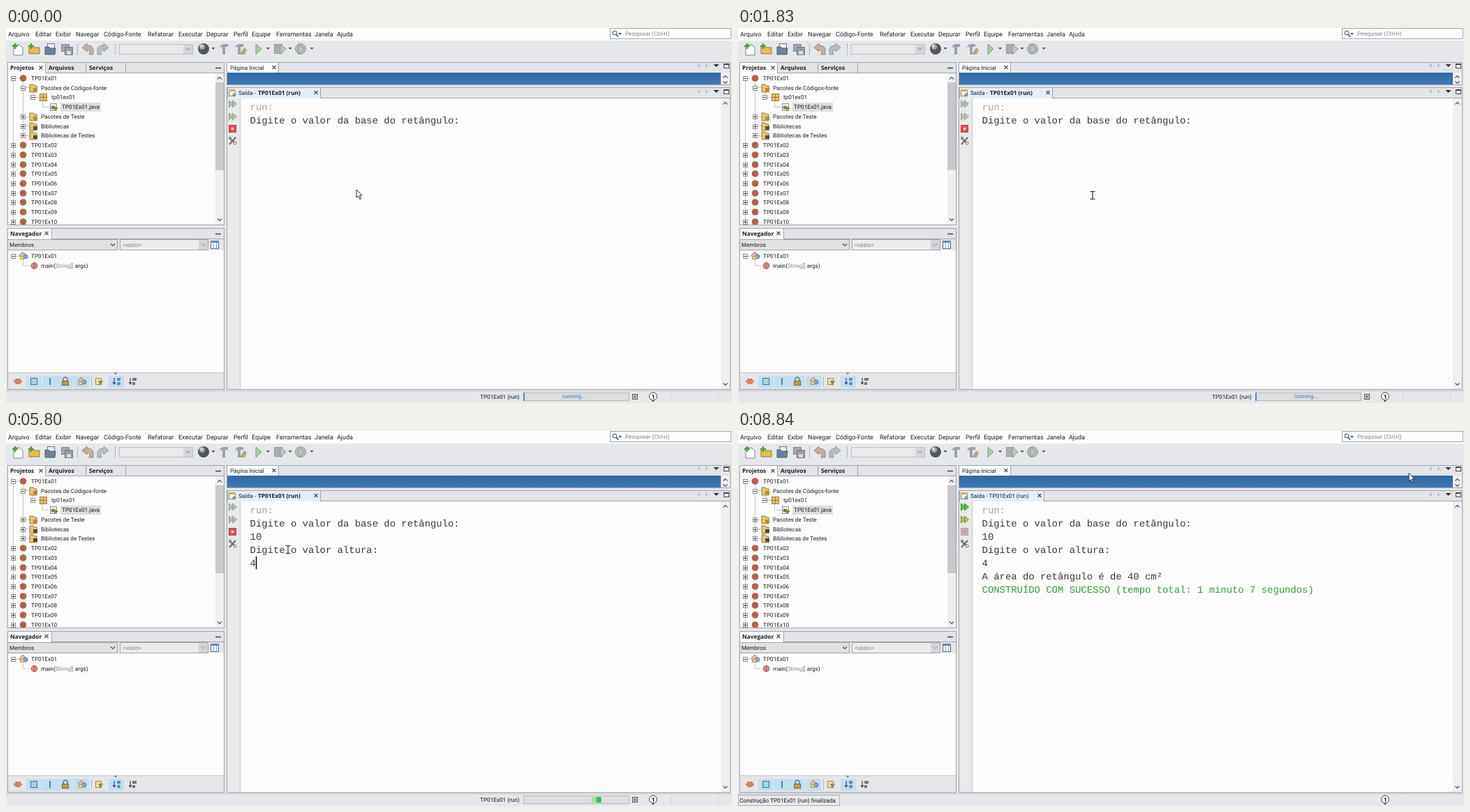
Write an HTML page that moves like this. It is 1040x538 px and loops after 8.87 s.

```html
<!DOCTYPE html>
<html lang="pt">
<head>
<meta charset="utf-8">
<title>Saída - TP01Ex01</title>
<style>
html, body { margin: 0; width: 100%; height: 100%; overflow: hidden; background: #e6e7ea; }
svg { display: block; width: 1040px; height: 538px; }
text { font: 8.2px Roboto, "Open Sans", sans-serif; fill: #1c1c22; white-space: pre; text-rendering: geometricPrecision; }
.menu { font-size: 9px; }
.bold { font: 700 8.3px "Open Sans", sans-serif; }
.dim { fill: #85858a; }
.blue { fill: #3a7fc0; }
.mono { font: 13.9px "Liberation Mono", "Courier New", monospace; fill: #39393d; }
.run { fill: #a2a2a2; }
.ok { fill: #399a39; }
</style>
</head>
<body>
<svg id="stage" viewBox="0 0 1040 538" xmlns="http://www.w3.org/2000/svg"></svg>
<script>
const LOOP = 8870, BG = '#e6e7ea', WHITE = '#fdfdfd', EDGE = '#a3a5ab';
const stage = document.getElementById('stage');

const rect = (x, y, w, h, fill, stroke) => stroke
  ? `<rect x="${x + .5}" y="${y + .5}" width="${w - 1}" height="${h - 1}" fill="${fill}" stroke="${stroke}"/>`
  : `<rect x="${x}" y="${y}" width="${w}" height="${h}" fill="${fill}"/>`;
const text = (x, y, s, cls = '') => `<text x="${x}" y="${y}" class="${cls}">${s}</text>`;
const line = (d, stroke = '#444', w = 1) => `<path d="${d}" fill="none" stroke="${stroke}" stroke-width="${w}"/>`;
const shape = (d, fill, stroke = 'none') => `<path d="${d}" fill="${fill}" stroke="${stroke}"/>`;
const dot = (x, y, r, fill, stroke = 'none') => `<circle cx="${x}" cy="${y}" r="${r}" fill="${fill}" stroke="${stroke}"/>`;
const group = (id, body) => `<g id="${id}">${body}</g>`;
const cross = (x, y) => line(`M${x - 2.5} ${y - 2.5}l5 5m0-5l-5 5`, '#444', 1.1);
const chevron = (x, y, dir = 1, color = '#555') => line(`M${x - 3} ${y - 1.5 * dir}l3 ${3 * dir}l3 ${-3 * dir}`, color, 1.2);
const drop = (x, y, color = '#555') => shape(`M${x - 2.5} ${y - 1}h5l-2.5 3z`, color);
const vbar = (x, y, h, color = '#b5b6bb') => rect(x, y, 1, h, color);

function menuBar() {
  const items = { Arquivo: 3, Editar: 42, Exibir: 71, Navegar: 100, 'Código-Fonte': 140, Refatorar: 203, Executar: 247,
    Depurar: 287, Perfil: 326, Equipe: 352, Ferramentas: 387, Janela: 442, Ajuda: 474 };
  return rect(0, 0, 1040, 18, WHITE) +
    Object.entries(items).map(([s, x]) => text(x, 12, s, 'menu')).join('') +
    rect(865, 0, 174, 16, WHITE, EDGE) + dot(872, 7, 3, '#dfeaf2', '#3d5a70') +
    line('M874 9l3 3.5', '#3d5a70', 1.8) + drop(879.5, 8) + text(887, 11, 'Pesquisar (Ctrl+I)', 'dim');
}

const folder = (x, y, fill, w = 14) =>
  shape(`M${x} ${y + 11}v-11h5l2 2h${w - 7}v9z`, fill, '#8d7848');
const plus = (x, y) => line(`M${x - 4} ${y}h8m-4-4v8`, '#4c9e3e', 2.4);

function toolBar() {
  const grey = '#9b9ca0';
  const hammer = x => shape(`M${x - 6} 28q2-5 6-5h6v4h-4v11h-4v-11z`, '#9aa3ad');
  const play = (x, c) => shape(`M${x - 4} 23l8 7-8 8z`, c, '#8b9a8b');
  // Block arrow that bends back on itself; dir 1 points left
  const bend = (x, dir, fill, edge) =>
    shape(`M${x - 8 * dir} 28l${7 * dir}-6v3q${9 * dir} 0 ${9 * dir} 6 0 6-${0} 6l-${0} 1h${-6 * dir}q${3 * dir}-7 ${-3 * dir}-7v3z`, fill, edge);
  return shape('M11 24h8l5 4v11h-13z', WHITE, '#7d8790') + plus(13, 26) +
    folder(33, 26, '#e7bd55', 15) + plus(36, 26) +
    rect(59, 22, 11, 10, '#eceef0', '#6c7884') + shape('M56 38v-11h5l2 2h8l-1 9z', '#6d8296', '#47637a') +
    rect(79, 23, 12, 11, '#a5a9b2', '#858991') + rect(84, 27, 12, 12, '#969ba6', '#777b83') + rect(87, 33, 6, 5, '#d9dadd') +
    vbar(102, 22, 17) + vbar(156, 22, 17) +
    bend(117, 1, '#c3b0a0', '#9a8878') + bend(139, -1, '#b4bfc3', '#8f9ca1') +
    rect(162, 23, 106, 15, '#e9e9e9', '#bfbfc1') + rect(254, 24, 13, 13, '#d6d6d8') + chevron(260.5, 30, 1, grey) +
    dot(283, 30, 8, '#535659') + dot(281, 27, 4, '#a4a7aa') + dot(280, 26, 2, '#d9dadb') + drop(297, 29) +
    hammer(312) + hammer(334) + shape('M335 38l6-10 4 3-3 7z', '#b5a68c') +
    play(362, '#a9cfa4') + drop(375.5, 29) +
    rect(384, 23, 12, 14, '#acadb2', grey) + play(397, '#bccab9') + drop(407, 29) +
    dot(422, 30, 7.5, '#b9babf', grey) + play(423, '#b7cbb4') + drop(438, 29);
}

// Window frame with a tab strip on top
const pane = (x, y, w, h) => rect(x, y, w, h, WHITE, EDGE) + rect(x + 1, y + 1, w - 2, 15, '#e3e4e7') +
  rect(x, y + 15, w, 1, EDGE);
const tab = (x, y, w, fill = WHITE) => rect(x, y, w, 16, fill, EDGE) + rect(x + 1, y + 15, w - 2, 1, fill);
const expander = (x, y, open) => rect(x - 3, y - 3, 7, 7, WHITE, '#8c8c8c') +
  line(`M${x - 1.5} ${y + .5}h4` + (open ? '' : `m-2-2v4`), '#333');

function scrollBar(x, y, h, w = 13) {
  return rect(x, y, w, h, '#efeff0') + chevron(x + w / 2, y + 7, -1) + chevron(x + w / 2, y + h - 7);
}

function projects() {
  const rowY = i => 72 + i * 13.73;
  const label = (x, i, s) => text(x, rowY(i) + 3, s);
  let s = pane(2, 49, 311, 234) + tab(2, 49, 55) + vbar(114, 50, 14, EDGE) + vbar(171, 50, 14, EDGE) +
    text(6, 60, 'Projetos', 'bold') + cross(50, 57) + text(61, 60, 'Arquivos', 'bold') +
    text(119, 60, 'Serviços', 'bold') + line('M300 57.5h8', '#444', 1.5);
  s += line('M10.5 76V280M24.5 76V154M38.5 90V99M52.5 104V113M10 72h10M24 85.5h10M38 99.5h10M52 113.5h10M24 127.5h10M24 140.5h10M24 154.5h10', '#c6c6c6');
  for (let i = 0; i < 16; i++) {
    if (i && i < 7) continue;
    const n = i ? i - 5 : 1, y = Math.round(rowY(i));
    s += expander(10, y, !i) + dot(24.5, y, 4.8, '#b4604a') + label(36, i, 'TP01Ex' + String(n).padStart(2, '0'));
  }
  ['Pacotes de Códigos-fonte', 'Pacotes de Teste', 'Bibliotecas', 'Bibliotecas de Testes'].forEach((name, k) => {
    const i = k ? k + 3 : 1, y = Math.round(rowY(i));
    s += expander(24, y, !k) + folder(34, y - 5, '#e8c66b', 10) +
      rect(39, y, 6, 5, k > 1 ? '#4d4a45' : '#b98a35') + label(50, i, name);
  });
  s += expander(38, 99, true) + rect(48, 94, 11, 11, '#e2c078', '#a07c3a') + line('M48 99.5h11M53.5 94v11', '#a07c3a') +
    label(65, 2, 'tp01ex01') + rect(78, 107, 58, 13, '#dedee0') +
    rect(63, 108, 10, 11, '#eef0f2', '#8a949c') + dot(67, 114, 2.5, '#b4604a') + shape('M69 112l6 3-6 4z', '#49a540') +
    label(80, 3, 'TP01Ex01.java');
  return s + rect(3, 282, 309, 1, EDGE) + scrollBar(300, 65, 217, 12) + rect(300, 78, 12, 126, '#c9c9cb') + rect(0, 283, 314, 4, BG);
}

function navigator() {
  const shapes = (x, y) => shape(`M${x - 6} ${y}l5-5 5 5-5 5z`, '#e9b6a9', '#b8776a') +
    dot(x + 3, y + 2, 3, '#7fa9d6', '#4f7cab') + rect(x - 5, y + 1, 6, 5, '#ecd27e', '#b59a45');
  const on = x => rect(x - 11, 499, 22, 17, '#c3dff2');
  let s = pane(2, 287, 311, 232) + tab(2, 287, 64) + text(6, 298, 'Navegador', 'bold') + cross(58, 294.5) +
    line('M300 295.5h8', '#444', 1.5) + rect(3, 303, 309, 16, '#e6e6e8') +
    rect(2, 303, 158, 16, '#e1e1e2', EDGE) + text(5, 314, 'Membros') + chevron(153, 311) +
    rect(163, 303, 127, 16, '#ebebec', EDGE) + rect(276, 304, 13, 14, '#d5d5d7') + text(167, 314, '&lt;vazio&gt;', 'dim') + chevron(282.5, 311, 1, '#aaa') +
    rect(293, 305, 12, 12, WHITE, '#48698c') + rect(293, 305, 12, 3, '#5f8bb8') + line('M297.5 308v9M301.5 308v9', '#8aa4bd') +
    line('M10 327.5h10M24.5 331v10h9', '#c6c6c6') + expander(10, 327, true) + shapes(25, 326) + text(36, 330, 'TP01Ex01') +
    dot(40.5, 341, 4.4, '#d58a86', '#a95450') + line('M40.5 337v8', '#b3605c') +
    text(50, 344, 'main(<tspan class="dim">String[]</tspan> args)');
  s += rect(3, 494, 309, 24, '#e6e6e9') + rect(3, 494, 309, 1, '#c5c6ca') + drop(157, 495.5, '#888') +
    [40, 63, 85, 108, 158].map(on).join('') +
    shape('M11 507l3-4h6l3 4-3 4h-6z', '#b9694f') + line('M14 504v7M17 503v9M20 504v7', '#f0c5a0') +
    rect(35, 502, 10, 10, '#a9d2dc', '#447887') + rect(62, 502, 2, 10, '#54869c') +
    rect(80, 506, 10, 7, '#bd9b52', '#7f6a38') + line('M82 506v-3q3-4 6 0v3', '#777', 1.5) + shapes(109, 506) +
    vbar(122, 500, 15) + rect(128, 502, 9, 10, '#f2e0ab', '#a88849') + shape('M132 506h7l-4 7z', '#6f9a59');
  for (const x of [155, 178]) s += line(`M${x} 502v9m-2-3l2 3 2-3`, '#446', 1.2);
  return s + rect(159, 502, 5, 4, '#6a8cad') + dot(161.5, 510, 2.5, '#6a8cad') + rect(181, 502, 6, 4, '#777') + rect(181, 508, 4, 4, '#777');
}

const strip = y => shape(`M994 ${y - 3}v6l-4-3z`, '#bfc0c4') + shape(`M1002 ${y - 3}v6l4-3z`, '#bfc0c4') +
  shape(`M1013.5 ${y - 2}h8l-4 4z`, '#333') + rect(1028, y - 3, 8, 7, WHITE, '#444') + rect(1028, y - 3, 8, 2, '#444');

// Output tab and its side buttons, in the running or the finished state
function outputTab(done) {
  const w = done ? 122 : 134;
  const rerun = (y, c, e) => shape(`M319.5 ${y - 5}l6 5-6 5z`, c, e) + shape(`M324.5 ${y - 5}l6 5-6 5z`, c, e);
  return tab(317, 85, w, '#e5eef6') + rect(319, 88, 10, 10, '#f7f3e4', '#93805a') + rect(319, 88, 10, 3, '#d9ae59') +
    dot(327, 96, 2.5, '#7b98ae') +
    text(333, 96, done ? 'Saída - TP01Ex01 (run)' : 'Saída - ') +
    (done ? '' : text(361, 96, 'TP01Ex01 (run)', 'bold')) + cross(317 + w - 7, 92.5) +
    rerun(109, done ? '#5fc04e' : '#b4c0b2', done ? '#3a8c30' : '#96a394') +
    rerun(127, done ? '#b7cd4c' : '#b9c0b0', done ? '#76892f' : '#9aa291') +
    rect(319, 139, 11, 11, done ? '#cdb0b4' : '#e0525c', done ? '#b298a0' : '#b2414b') +
    rect(323, 143, 3, 3, done ? '#a99' : '#fff');
}

function editor() {
  return pane(316, 49, 722, 33) + tab(316, 49, 75) + text(321, 60, 'Página Inicial') + cross(384, 56.5) + strip(54) +
    rect(317, 64, 707, 18, 'url(#banner)') + rect(1024, 64, 13, 18, '#efeff0') +
    chevron(1030.5, 70, -1) + chevron(1030.5, 78) + rect(316, 81, 722, 1, EDGE) +
    pane(316, 85, 722, 434) + rect(317, 101, 18, 417, '#e9e9eb') + vbar(335, 101, 417, '#c9cacd') + strip(91) +
    scrollBar(1024, 101, 417) + group('tabRun', outputTab(false)) + group('tabDone', outputTab(true)) +
    line('M320 158l9 8M329 157l-9 10', '#6e6a62', 2) + dot(321, 158, 2.2, '#888d92') + dot(328, 165, 2, WHITE, '#666');
}

function statusBar() {
  return rect(0, 520, 1040, 1, '#c4c5c9') +
    group('job', text(679, 532, 'TP01Ex01 (run)') + rect(741, 523, 152, 12, '#dedfe0', '#b6b7ba') +
      group('idle', rect(741, 523, 2, 12, '#5a86bb') + text(797, 531, 'running...', 'blue')) +
      group('chunk', rect(0, 525, 7, 8, '#9fe0a9') + rect(7, 525, 7, 8, '#35c254')) +
      rect(897, 525, 8, 8, '#d8d8da', '#555') + line('M899 527l4 4m0-4l-4 4', '#555')) +
    shape('M925 533l2 4 2-4z', '#444') + dot(927, 528.5, 5.5, WHITE, '#444') + text(924.7, 531.7, '1', 'bold') +
    vbar(952, 524, 11, '#d2d3d6') + vbar(1020, 524, 11, '#d2d3d6') +
    group('built', rect(0, 522, 146, 16, '#e8e8ea', '#aeb0b5') + text(2, 533, 'Construção TP01Ex01 (run) finalizada.'));
}

const lineY = n => 117.6 + n * 19.05;
const output = [
  ['run:', 0, 'run'],
  ['Digite o valor da base do retângulo:', 0],
  ['', 0],
  ['Digite o valor altura:', 4600],
  ['', 0],
  ['A área do retângulo é de 40 cm²', 6240],
  ['CONSTRUÍDO COM SUCESSO (tempo total: 1 minuto 7 segundos)', 6300, 'ok'],
];

stage.innerHTML = '<defs><linearGradient id="banner" x2="0" y2="1"><stop stop-color="#3169a6"/><stop offset="1" stop-color="#417ab5"/></linearGradient></defs>' +
  rect(0, 0, 1040, 538, BG) + menuBar() + toolBar() + projects() + navigator() + editor() + statusBar() +
  output.map(([s, , cls = ''], i) => `<text id="out${i}" x="349.6" y="${lineY(i)}" class="mono ${cls}">${s}</text>`).join('') +
  group('caret', rect(0, 0, 1.6, 18.5, '#111')) +
  group('beam', line('M-3.5-5.5h2.5l1 1 1-1h2.5M0-4.5v9M-3.5 5.5h2.5l1-1 1 1h2.5', '#222', 1.1)) +
  group('arrow', shape('M0 0v11.5l2.6-2.5 2 4.6 1.9-.8-2-4.5h3.6z', '#fff', '#222'));

const el = id => document.getElementById(id);
const show = (id, on) => { el(id).style.display = on ? '' : 'none'; };
const move = (id, x, y) => el(id).setAttribute('transform', `translate(${x} ${y})`);
const clamp = v => Math.min(1, Math.max(0, v));
const mix = (a, b, k) => a + (b - a) * k;

// [time, caret line, caret column]; every entry restarts the blink
const carets = [[2470, 2, 0], [3800, 2, 1], [4230, 2, 2], [4600, 4, 0], [5600, 4, 1], [6240, 7, 0]];

function pointer(t) {
  if (t < 1830) return [502, 232, true];
  const k = clamp((t - 1830) / 500), e = k * k * (3 - 2 * k);
  if (t < 7967) return [mix(508, 404, e), mix(240, 170, e), false];
  const u = clamp((t - 7967) / 873), v = 1 - u;
  const y = v * v * 170 + 2 * u * v * 100 + u * u * 60.5;
  return [mix(404, 961, u), y, y < 101];
}

function draw(t) {
  const [x, y, isArrow] = pointer(t);
  show('arrow', isArrow);
  show('beam', !isArrow);
  move(isArrow ? 'arrow' : 'beam', x, y);

  output.forEach(([, at], i) => show('out' + i, t >= at));
  el('out2').textContent = t < 3800 ? '' : t < 4230 ? '1' : '10';
  el('out4').textContent = t < 5600 ? '' : '4';

  const c = carets.filter(k => t >= k[0]).pop();
  show('caret', c && (t - c[0]) % 1000 < 500);
  if (c) move('caret', 349.4 + c[2] * 8.34, lineY(c[1]) - 14);

  const done = t >= 6300;
  show('tabRun', !done);
  show('tabDone', done);
  show('built', done);
  show('job', t < 6840);
  show('idle', t < 4735);
  show('chunk', t >= 4735);
  const p = (t - 4735) / 1500, back = p > 1;
  const left = 742 + 136 * clamp(back ? 2 - p : p);
  el('chunk').setAttribute('transform', back ? `translate(${left + 14} 0) scale(-1 1)` : `translate(${left} 0)`);
}

const start = performance.now();
function tick() {
  draw((performance.now() - start) % LOOP);
  requestAnimationFrame(tick);
}
tick();
</script>
</body>
</html>
```
